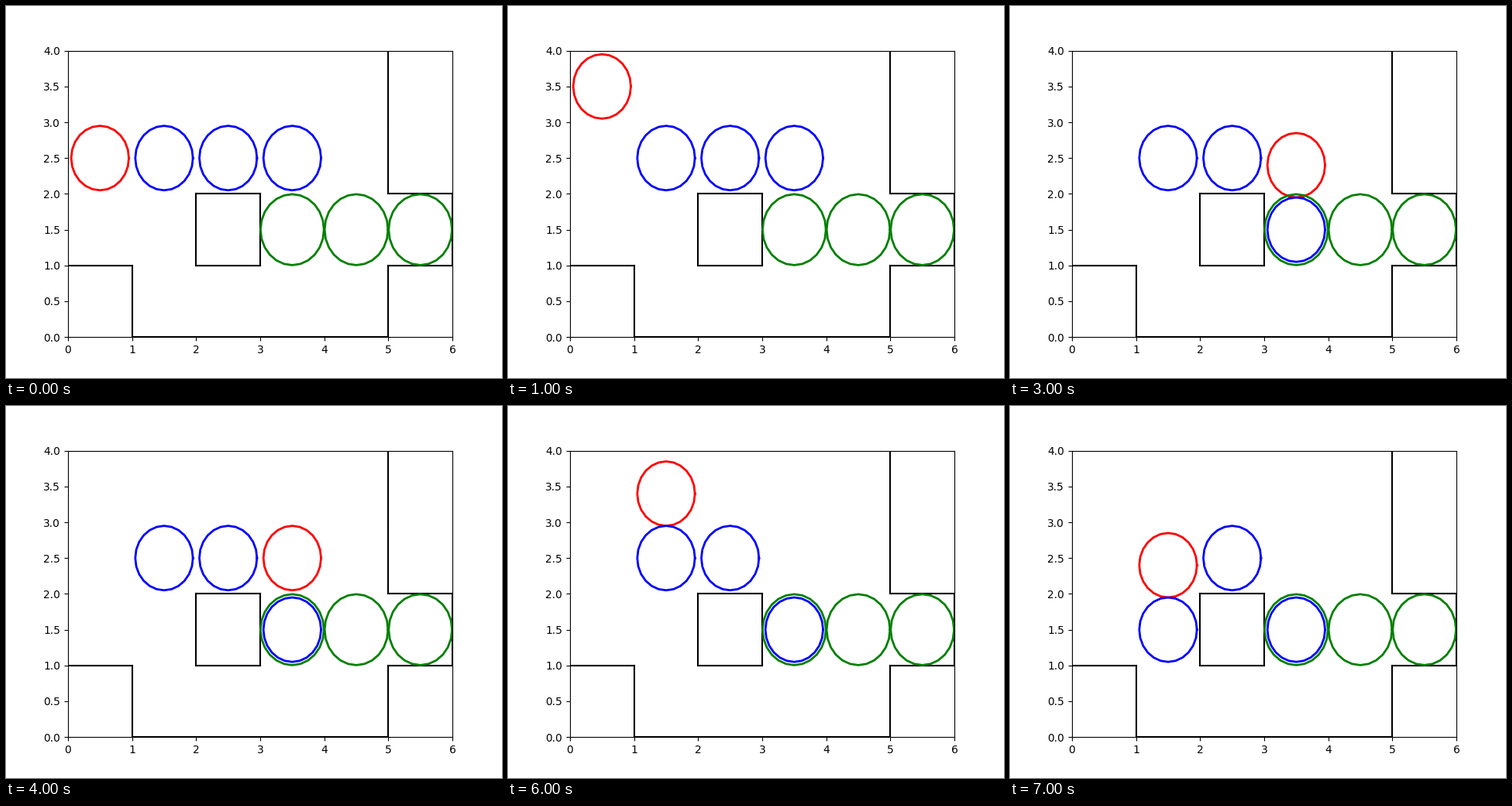
A matplotlib script that plays this animation: 640x480 px, repeating every 8 s.

```python
import numpy as np
import matplotlib.pyplot as plt
from matplotlib.animation import FuncAnimation

STEP_MS = 1000
RADIUS = 0.45

# '#' wall, '@' robot, '$' box, 'o' goal; top row first
ROOM = [".....#",
        "@$$$.#",
        "..#ooo",
        "#....#"]
ROWS, COLS = len(ROOM), len(ROOM[0])


def cell(col, row):
    inside = 0 <= col < COLS and 0 <= row < ROWS
    return ROOM[ROWS - 1 - row][col] if inside else "#"


def centers(kind):
    return [np.array([c + 0.5, r + 0.5]) for r in range(ROWS)
            for c in range(COLS) if cell(c, r) == kind]


def plan():
    """List (robot, boxes) for every step of the robot's trip."""
    robot, boxes = centers("@")[0], centers("$")
    states = []

    def log():
        states.append((robot.copy(), [b.copy() for b in boxes]))

    def go(target):
        robot[:] = target
        log()

    def push_down(i):
        go(boxes[i] + (0, 2 * RADIUS))
        boxes[i] -= (0, 1)
        go(robot - (0, 1))

    log()
    go(robot + (0, 1))
    push_down(2)
    go(np.floor(robot) + 0.5)
    go(robot + 1)
    push_down(0)
    return states


def draw_walls():
    for r in range(-1, ROWS):
        for c in range(-1, COLS):
            wall = cell(c, r) == "#"
            if wall != (cell(c + 1, r) == "#"):
                ax.plot([c + 1, c + 1], [r, r + 1], "k", lw=1.5)
            if wall != (cell(c, r + 1) == "#"):
                ax.plot([c, c + 1], [r + 1, r + 1], "k", lw=1.5)


ANGLES = np.linspace(0, 2 * np.pi, 25)
UNIT_RING = np.array([np.cos(ANGLES), np.sin(ANGLES)])


def place(line, center, radius=RADIUS):
    line.set_data(*(center[:, None] + radius * UNIT_RING))


def ring(center, color, radius=RADIUS):
    line, = ax.plot([], [], color=color, lw=2)
    place(line, center, radius)
    return line


fig, ax = plt.subplots(figsize=(6.4, 4.8), dpi=100)
ax.set_xlim(0, COLS)
ax.set_ylim(0, ROWS)
draw_walls()

states = plan()
robot_ring = ring(states[0][0], "red")
box_rings = [ring(b, "blue") for b in states[0][1]]
for goal in centers("o"):
    ring(goal, "green", 1.1 * RADIUS)


def update(step):
    robot, boxes = states[step]
    place(robot_ring, robot)
    for line, box in zip(box_rings, boxes):
        place(line, box)
    return [robot_ring, *box_rings]


anim = FuncAnimation(fig, update, frames=len(states), interval=STEP_MS,
                     repeat=True, repeat_delay=0, blit=False)
plt.show()
```
